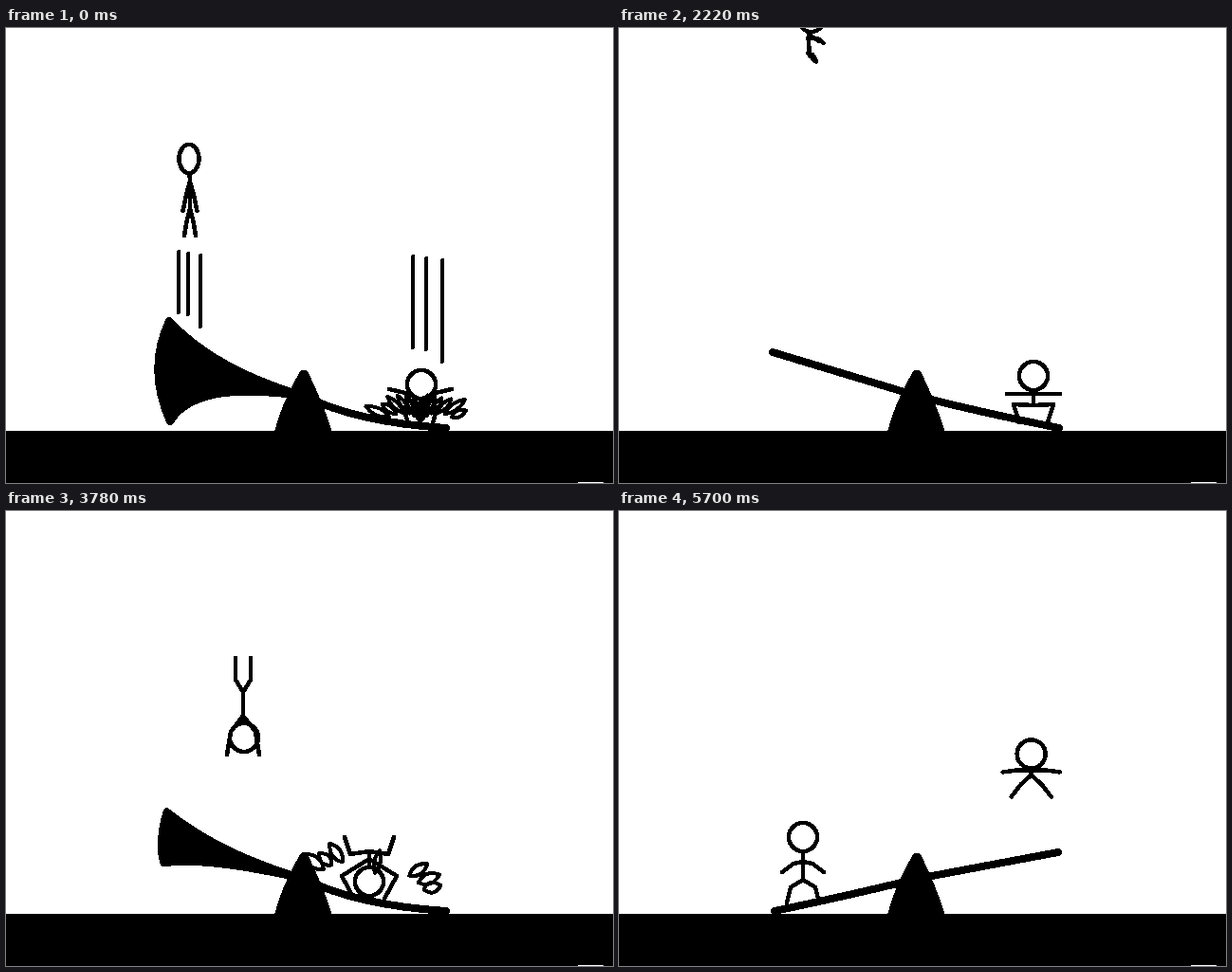
These frames come from a looping animation (640x480 px, 5760 ms). An HTML page:

```html
<!DOCTYPE html>
<html lang="en">
<head>
<meta charset="utf-8">
<title>Seesaw</title>
<style>
html, body { margin: 0; width: 100%; height: 100%; overflow: hidden; background: #fff; }
svg { display: block; width: 640px; height: 480px; }
.ink { fill: none; stroke: #000; stroke-width: 4; stroke-linecap: round; stroke-linejoin: round; }
#plank { stroke-width: 8; }
#flare { stroke-width: 8; fill: #000; }
#left, #right { stroke-width: 4.5; }
</style>
</head>
<body>
<svg viewBox="0 0 640 480" shape-rendering="crispEdges">
  <path id="plank" class="ink"/>
  <path id="flare" class="ink"/>
  <path d="M283 426Q290 397 309 364Q314 357 319 364Q334 395 344 426Z"/>
  <path id="debris" class="ink"/>
  <path id="lines" class="ink"/>
  <path id="left" class="ink"/>
  <path id="right" class="ink"/>
  <rect y="425" width="640" height="55"/>
  <rect x="603" y="479" width="27" height="1" fill="#fff"/>
</svg>
<script>
const STEP = 60, COUNT = 96;

// The two jumpers land in turn; each landing throws the other one up to the given apex.
const impacts = [
  { at: 0, side: "right", x: 437, apex: 10 },
  { at: 17, side: "left", x: 193, apex: 10 },
  { at: 32, side: "right", x: 437, apex: 10 },
  { at: 47, side: "left", x: 250, apex: 36, headDown: true },
  { at: 62, side: "right", x: 383, apex: 140, headDown: true },
  { at: 71, side: "left", x: 250, apex: 150, headDown: true },
  { at: 79, side: "right", x: 383, apex: 175, headDown: true },
  { at: 88, side: "left", x: 194, apex: 165 }
];

const clamp = v => Math.max(0, Math.min(1, v));
const mix = (a, b, k) => a + (b - a) * k;
const mixPt = (a, b, k) => [mix(a[0], b[0], k), mix(a[1], b[1], k)];
const blend = (a, b, k) => a.map((p, i) => mixPt(p, b[i], k));
const smooth = v => v * v * (3 - 2 * v);
const random = i => Math.abs(Math.sin(i * 12.9898) * 43758.5453) % 1;
const draw = (id, d) => document.getElementById(id).setAttribute("d", d);

// One arm and one leg are given around the hip; the other pair is mirrored.
function pose(head, shoulder, elbow, hand, knee, foot, { hip = [0, 0], mirror = -1, width = 15 } = {}) {
  const other = ([x, y]) => [x * mirror, y];
  return [head, shoulder, hip, elbow, hand, other(elbow), other(hand),
    knee, foot, other(knee), other(foot), [width, 15]];
}
const rise = pose([1, -52], [0, -28], [4, -14], [7.5, 3], [3.5, 14], [6, 29], { width: 10.5 });
const spread = pose([0, -50], [0, -22], [14, -22], [25, -18], [18, 0], [27, 15]);
const drop = pose([0, -22], [0, -5], [15, -5], [30, -3], [11, 10], [21, 23]);
const tuck = pose([27, -10], [20, 9], [13, -4], [-6, -9], [7, 4], [-11, 1], { hip: [5, 18], mirror: .5 });
const spear = pose([1, -48], [0, -25], [13, -42], [17, -66], [8, 13], [8, 36]);

const stances = {
  upright: {
    launchY: 190, hitY: 402, crouchY: 398, standY: 389, rise, drop,
    hit: pose([1, -26], [0, -10], [16, -17], [33, -21], [18, -2], [12, 18]),
    crouch: pose([0, -31], [0, -12], [14, -12], [28, -12], [21, -1], [15, 18]),
    stand: pose([0, -45], [0, -19], [10, -17], [22, -8], [13, 8], [17, 24])
  },
  headDown: {
    launchY: 232, hitY: 359, crouchY: 351, standY: 336, rise: spear, drop: spear,
    crouch: pose([0, -32], [0, -8], [29, -26], [16, -50], [20, -3], [26, 15]),
    stand: pose([0, -34], [0, -16], [15, -32], [18, -65], [17, 9], [16, 27])
  }
};
stances.headDown.hit = stances.headDown.crouch;
const stanceOf = impact => impact.headDown ? stances.headDown : stances.upright;
const spin = side => side === "left" ? 1 : -1;

function onGround(impact, n) {
  const s = stanceOf(impact), up = clamp((n - 5) / 2), hit = n < 2;
  return {
    side: impact.side, x: impact.x,
    y: hit ? s.hitY : mix(s.crouchY, s.standY, up),
    shape: hit ? s.hit : blend(s.crouch, s.stand, up),
    turn: impact.headDown ? 180 : 0
  };
}

function inFlight(from, to, apex, u) {
  const a = stanceOf(from), b = stanceOf(to), flip = a !== b;
  const rising = a.launchY - apex, falling = b.crouchY - 55 - apex;
  const peak = 1 / (1 + Math.sqrt(falling / rising));
  const turned = smooth(clamp((u - .2) / .6));
  const middle = flip ? tuck : from.headDown ? spear : spread;
  const bend = clamp(1.5 * Math.sin(Math.PI * turned));
  return {
    side: from.side,
    x: mix(from.x, to.x, smooth(u)),
    y: apex + rising * (1 - u / peak) ** 2,
    shape: blend(blend(a.rise, b.drop, turned), middle, bend),
    turn: spin(from.side) * 180 * ((from.headDown ? 1 : 0) + (flip ? turned : 0))
  };
}

function figure({ side, x, y, shape, turn }) {
  const angle = turn * Math.PI / 180, c = Math.cos(angle), s = Math.sin(angle), flip = -spin(side);
  const place = ([px, py]) => [x + px * flip * c - py * s, y + px * flip * s + py * c];
  const [head, shoulder, hip, elbowA, handA, elbowB, handB, kneeA, footA, kneeB, footB, [rx, ry]] = shape;
  const limb = (...pts) => "M" + pts.map(place).join("L");
  const dx = shoulder[0] - head[0], dy = shoulder[1] - head[1], d = Math.hypot(dx, dy) || 1;
  const neck = [head[0] + dx / d * rx, head[1] + dy / d * ry];
  const top = place([head[0], head[1] - ry]), chin = place([head[0], head[1] + ry]);
  const arc = `A${rx} ${ry} ${turn} 0 1 `;
  return `M${top}${arc}${chin}${arc}${top}` + limb(neck, shoulder, hip) +
    limb(handA, elbowA, shoulder, elbowB, handB) + limb(footA, kneeA, hip, kneeB, footB);
}

// The thrown end of the plank leaves a flared blur that shrinks back to a bar.
function flare(root, tip, { top, topBend, edgeBend, bottom, nearBend, farBend }, n) {
  const u = n < 3 ? 1 - n / 4 : 0, w = n < 2 ? 1 - n * .6 : 0;
  const along = k => mixPt(root, tip, k);
  const t = mixPt(tip, top, u), b = mixPt(tip, bottom, w);
  return `M${root}Q${mixPt(along(.5), topBend, u)} ${t}Q${mixPt(mixPt(t, b, .5), edgeBend, w)} ${b}` +
    `C${mixPt(along(.67), farBend, w)} ${mixPt(along(.33), nearBend, w)} ${root}Z`;
}

const pivot = [314, 388];
const ends = {
  right: {
    down: [464, 422], bend: [370, 403], up: [162, 342],
    blur: {
      top: [172, 309], topBend: [221, 361], edgeBend: [148, 360],
      bottom: [173, 415], nearBend: [250, 380], farBend: [195, 380]
    }
  },
  left: {
    down: [164, 422], bend: [245, 405], up: [463, 360],
    blur: {
      top: [435, 291], topBend: [390, 358], edgeBend: [472, 342],
      bottom: [459, 411], nearBend: [370, 354], farBend: [432, 354]
    }
  }
};

function drawPlank(side, n) {
  const { down, bend, up, blur } = ends[side], sag = n < 2 ? 13 : 0;
  draw("plank", `M${pivot}Q${bend[0]} ${bend[1] + sag} ${down}`);
  draw("flare", flare(pivot, up, blur, n));
}

// Leaf-shaped splinters fan out from the landing spot, square to the plank or the ground.
function splash({ x, side, headDown }, n) {
  if (n > 1) return "";
  const count = headDown ? 7 : 13, y = headDown ? 412 : 425, tilt = headDown ? -.2 * spin(side) : 0;
  let d = "";
  for (let i = 0; i < count; i++) {
    const even = i / (count - 1) * 2 - 1, k = headDown ? Math.cbrt(even) : even;
    const angle = k * 1.15 + tilt, size = .82 + .18 * random(i + 1);
    const at = (r, turn = 0) => [x + r * Math.sin(angle + turn), y - r * Math.cos(angle + turn)];
    const inner = 8 + 28 * Math.abs(k) + n * 23, outer = (36 + 28 * Math.abs(k)) * size + n * 23;
    const mid = (inner + outer) / 2, root = at(inner), tip = at(outer);
    d += `M${root}Q${at(mid, -.16)} ${tip}Q${at(mid, .16)} ${root}`;
  }
  return d;
}

function streaks(x, offsets, top, length) {
  return offsets.map((o, i) => `M${x + o} ${top + i * 2}v${length + (i === 2 ? 9 : -2)}`).join("");
}

function render(f) {
  const i = impacts.findLastIndex(q => q.at <= f);
  const now = impacts[i], from = impacts.at(i - 1), to = impacts[(i + 1) % impacts.length];
  const n = f - now.at, span = (to.at || COUNT) - now.at;
  const lander = onGround(now, n), flyer = inFlight(from, to, now.apex, n / span);
  draw(lander.side, figure(lander));
  draw(flyer.side, figure(flyer));
  drawPlank(now.side, n);
  draw("debris", splash(now, n));
  draw("lines", n ? "" :
    (now.headDown ? streaks(now.x, [-16, 0, 18], 268, 66) : streaks(now.x, [-8, 6, 23], 241, 98)) +
    (from.headDown ? streaks(flyer.x, [-16, -4, 11], flyer.y + 72, 86) : streaks(flyer.x, [-12, -2, 11], flyer.y + 46, 66)));
}

function tick() {
  render(Math.floor(performance.now() / STEP) % COUNT);
  requestAnimationFrame(tick);
}
tick();
</script>
</body>
</html>
```
